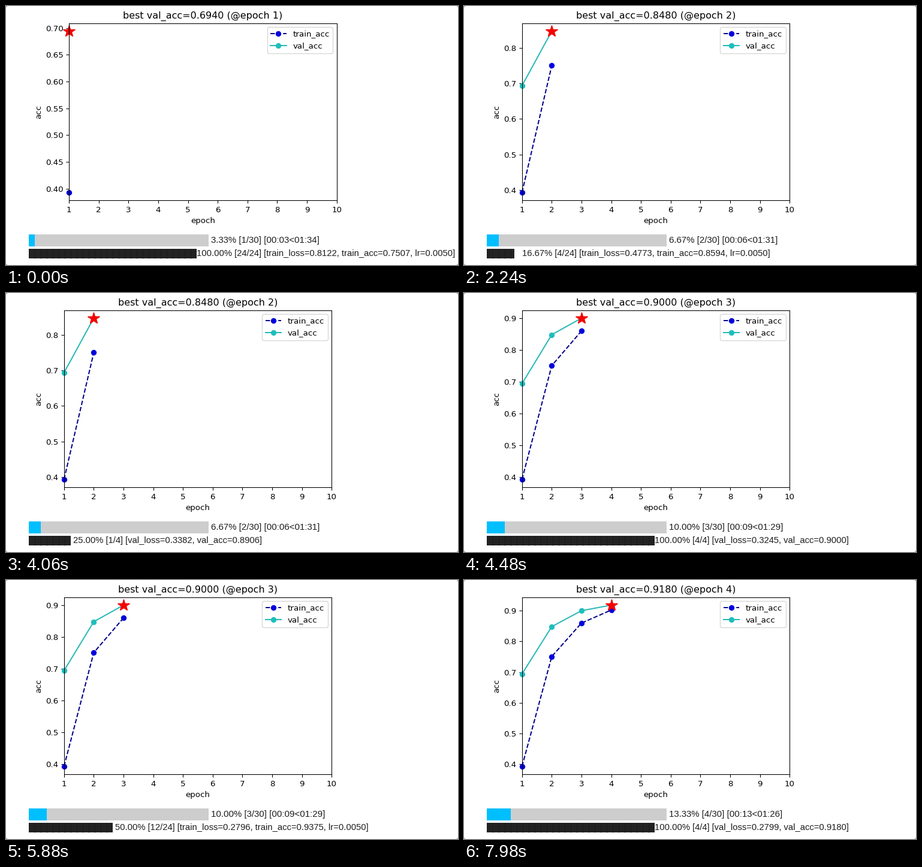
A matplotlib script for the animation above (8000 ms loop, 754 by 432 pixels).

```python
import matplotlib.pyplot as plt
import numpy as np
from matplotlib.animation import FuncAnimation
from matplotlib.patches import FancyBboxPatch, Rectangle

W, H, DPI = 754, 432, 96
LOOP, STEP = 8000, 25

TRAIN = [0.3930, 0.7507, 0.8597, 0.9020]
VAL = [0.6940, 0.8480, 0.9000, 0.9180]
CLOCK = ["00:03<01:34", "00:06<01:31", "00:09<01:29", "00:13<01:26"]
EPOCH_STARTS = [0, 910, 4480, 7910]

BAR_X, CELL, CELLS = 38, 10, 28
EPOCH_W, EPOCHS = 300, 30
SPACE = 4.1


def train_row(t, done, loss, acc):
    info = f"[train_loss={loss:.4f}, train_acc={acc:.4f}, lr=0.0050]"
    return t, done, 24, info


def val_row(t, done, loss, acc):
    return t, done, 4, f"[val_loss={loss:.4f}, val_acc={acc:.4f}]"


def train_run(start, end, batches, losses, accs):
    """Seven quick updates up to batch 23, then the finished bar."""
    rows = []
    for i, pos in enumerate(np.linspace(batches[0], 23, 7)):
        done = int(round(pos))
        loss, acc = np.interp(done, batches, losses), np.interp(done, batches, accs)
        rows.append(train_row(start + 70 * i, done, loss, acc))
    return rows + [train_row(end, 24, losses[-1], accs[-1])]


ROWS = [
    train_row(0, 24, 0.8122, 0.7507),
    val_row(490, 3, 0.4786, 0.8464),
    val_row(770, 4, 0.4729, 0.8480),
    *train_run(2240, 2870, (4, 13, 24), (0.4773, 0.4921, 0.4776), (0.8594, 0.8534, 0.8597)),
    val_row(4060, 1, 0.3382, 0.8906),
    val_row(4130, 3, 0.3268, 0.8984),
    val_row(4340, 4, 0.3245, 0.9000),
    *train_run(5670, 6370, (1, 12, 24), (0.2658, 0.2796, 0.3184), (0.9531, 0.9375, 0.9020)),
    val_row(7560, 1, 0.2846, 0.9141),
    val_row(7840, 4, 0.2799, 0.9180),
]

plt.rcParams["font.family"] = "DejaVu Sans"
fig = plt.figure(figsize=(W / DPI, H / DPI), dpi=DPI, facecolor="#a8a8a8")

# Pixel-space layer for the window and the progress bars
stage = fig.add_axes([0, 0, 1, 1], zorder=-1)
stage.set(xlim=(0, W), ylim=(H, 0))
stage.axis("off")
stage.add_patch(FancyBboxPatch((0, 0), W, H, fc="white", ec="none",
                               boxstyle="round,pad=0,rounding_size=4"))


def add_bar(y, width, height, color):
    return stage.add_patch(Rectangle((BAR_X, y), width, height, fc=color, ec="none"))


def add_label(x, y, size):
    return stage.text(x, y, "", family="Liberation Sans", size=size,
                      color="#1c1c1c", va="baseline")


add_bar(381, EPOCH_W, 20, "#cdcdcd")
epoch_bar = add_bar(381, 0, 20, "#00bfff")
batch_bar = add_bar(404.5, 0, 16.5, "#222222")
seams = stage.vlines([], 404.5, 421, colors="#1a1a1a", lw=0.75)
epoch_label = add_label(341.7, 395, 11.25)
batch_label = add_label(BAR_X, 417, 11.05)

ax = fig.add_axes([0.1, 0.1, 0.5, 0.5], facecolor="none")
ax.set(xlim=(1, 10), xticks=range(1, 11), xlabel="epoch", ylabel="acc")
train_line, = ax.plot([], [], "o--", color="#00008c", mfc="#0000dc", mec="#0000dc",
                      label="train_acc", clip_on=False)
val_line, = ax.plot([], [], "o-", color="#28b8b8", mfc="#1ebebb", mec="#1ebebb",
                    label="val_acc", clip_on=False)
star, = ax.plot([], [], "*", color="#f40000", ms=15, clip_on=False)
ax.legend(loc="upper right")
title = ax.set_title("")


def draw_plot(n):
    # Two-decimal tick labels push the first chart to the right
    left = 105.2 if n == 1 else 96.8
    ax.set_position([left / W, (H - 324.2) / H, 446.4 / W, 295.7 / H])
    x = np.arange(1, n + 1)
    train_line.set_data(x, TRAIN[:n])
    val_line.set_data(x, VAL[:n])
    star.set_data([n], [VAL[n - 1]])
    low, high = TRAIN[0], VAL[n - 1]
    pad = 0.05 * (high - low)
    ax.set_ylim(low - pad, high + pad)
    title.set_text(f"best val_acc={VAL[n - 1]:.4f} (@epoch {n})")


def draw_epoch_bar(n):
    epoch_bar.set_width(EPOCH_W * n / EPOCHS)
    epoch_label.set_text(f"{100 * n / EPOCHS:.2f}% [{n}/{EPOCHS}] [{CLOCK[n - 1]}]")


def draw_batch_bar(done, total, info):
    full, part = divmod(CELLS * done, total)
    # A partly filled cell is drawn in eighths
    eighths = 8 * part // total
    width = CELL * (full + eighths / 8)
    batch_bar.set_width(width)
    edges = BAR_X + CELL * np.arange(1, full + 1)
    seams.set_segments([[(x, 404.5), (x, 421)] for x in edges if x < BAR_X + width])
    percent = f"{100 * done / total:.2f}%"
    gap = (15.3 if part else 0) + SPACE * (7 - len(percent))
    batch_label.set_x(BAR_X + CELL * full + gap)
    batch_label.set_text(f"{percent} [{done}/{total}] {info}")


def update(i):
    t = (i + 1) * STEP - 1
    n = sum(start <= t for start in EPOCH_STARTS)
    draw_plot(n)
    draw_epoch_bar(n)
    draw_batch_bar(*[row for row in ROWS if row[0] <= t][-1][1:])
    return []


anim = FuncAnimation(fig, update, frames=LOOP // STEP, interval=STEP,
                     init_func=lambda: update(0), repeat=True, repeat_delay=0)
plt.show()
```
